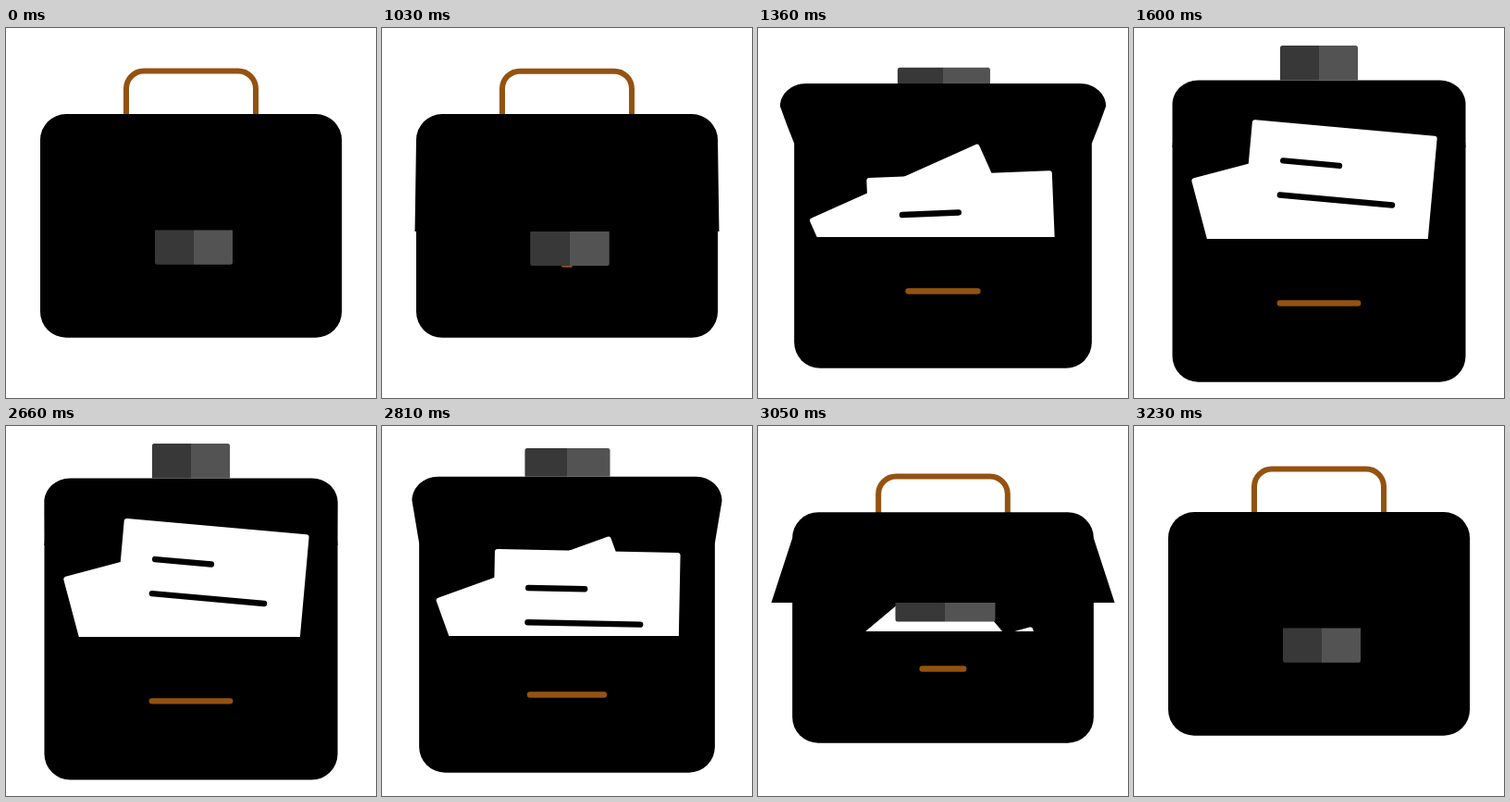
These frames come from a looping animation (400x400 px, 3.26 s). An HTML page with a canvas:

```html
<!DOCTYPE html>
<html lang="en">
<head>
<meta charset="utf-8">
<title>Briefcase</title>
<style>
  html, body { margin: 0; width: 100%; height: 100%; overflow: hidden; background: #fff; }
  canvas { display: block; width: 400px; height: 400px; }
</style>
</head>
<body>
<canvas></canvas>
<script>
const LOOP = 3260, STEP = 30, STEPS = 20, OPEN_AT = 1000, CLOSE_AT = 2630;
const BROWN = '#945210';
const canvas = document.querySelector('canvas');
const ctx = canvas.getContext('2d');
const ratio = window.devicePixelRatio || 1;
canvas.width = canvas.height = 400 * ratio;
ctx.scale(ratio, ratio);

const clamp = (v, lo = 0, hi = 1) => Math.min(hi, Math.max(lo, v));
const stepped = ms => clamp(Math.floor(ms / STEP) / STEPS);
const easeInOut = q => q < .5 ? .5 * (2 * q) ** 2.15 : 1 - .5 * (2 - 2 * q) ** 2.15;

// Piecewise linear value through [position, value] stops.
function track(p, stops) {
  const i = Math.max(1, stops.findIndex(s => s[0] >= p));
  const [p0, v0] = stops[i - 1], [p1, v1] = stops[i];
  return v0 + (v1 - v0) * (p - p0) / (p1 - p0);
}

function roundBox(x, y, w, h, radii, color) {
  ctx.beginPath();
  ctx.roundRect(x, y, w, h, radii);
  ctx.fillStyle = color;
  ctx.fill();
}

function line(x0, x1, y, color) {
  ctx.beginPath();
  ctx.moveTo(x0, y);
  ctx.lineTo(x1, y);
  ctx.lineWidth = 6.4;
  ctx.lineCap = 'round';
  ctx.strokeStyle = color;
  ctx.stroke();
}

// A sheet is placed by the middle of its top edge.
function sheet(x, y, degrees, lines = []) {
  ctx.save();
  ctx.translate(x, y);
  ctx.rotate(degrees * Math.PI / 180);
  roundBox(-100.3, 0, 200.6, 260, 3, '#fff');
  for (const [x0, x1, ly] of lines) line(x0, x1, ly, '#000');
  ctx.restore();
}

function drawContents(p, q) {
  ctx.save();
  ctx.beginPath();
  ctx.rect(0, 0, 400, Math.round(220.4 + 8 * p));
  ctx.clip();
  sheet(119.7 + 39 * p, 228.9 - 91.4 * p, -45 + 30.2 * p);
  sheet(194 + 34 * p, 270 - 162 * p, -19.2 + 24.4 * p,
    [[-63.3, -2.3, 41.3], [-63.3, 58.4, 78.5]]);
  ctx.restore();
  const half = 42.2 * (1 - (1 - q ** 1.2) ** 2.8);
  line(200 - half, 200 + half, 255.5 + 42 * p, BROWN);
}

// The flap swings through half a turn; its free edge widens toward the viewer.
function drawFlap(p, side, neck, edge, spread) {
  const ry = clamp(.38 * (neck - edge), 0, 26);
  const rx = Math.min(28, ry * 2);
  const outer = side - spread;
  const shoulder = edge + ry;
  const bendX = outer + spread * Math.min(.5, 2.4 * Math.abs(p - .5));
  const bendY = (shoulder + neck) / 2;
  const k = .448;
  ctx.beginPath();
  ctx.moveTo(side, neck);
  ctx.quadraticCurveTo(bendX, bendY, outer, shoulder);
  ctx.bezierCurveTo(outer, edge + ry * k, outer + rx * k, edge, outer + rx, edge);
  ctx.lineTo(400 - outer - rx, edge);
  ctx.bezierCurveTo(400 - outer - rx * k, edge, 400 - outer, edge + ry * k, 400 - outer, shoulder);
  ctx.quadraticCurveTo(400 - bendX, bendY, 400 - side, neck);
  ctx.fillStyle = '#000';
  ctx.fill();
}

function drawLatch(p, edge, swing) {
  const width = 84 + 30 * swing;
  const left = 200 + 3 * (1 - p) - width / 2;
  const middle = 203 - 3 * Math.min(1, 2 * p);
  const height = track(p, [[0, 37.3], [.5, -13], [.69, -17.2], [.9, -37], [1, -37.4]]);
  const y = Math.min(edge, edge + height), h = Math.abs(height);
  const down = height > 0;
  roundBox(left, y, middle - left, h, down ? [0, 0, 0, 2.5] : [2.5, 0, 0, 0], '#383838');
  roundBox(middle, y, left + width - middle, h, down ? [0, 0, 2.5, 0] : [0, 2.5, 0, 0], '#535353');
}

function draw(q) {
  const p = easeInOut(q);
  const turn = p ** (.73 - .28 * p);
  const sin = Math.sin(Math.PI * turn), cos = Math.cos(Math.PI * turn);
  const side = 37 + 4.5 * p * p;
  const top = 93 + 8 * p * p;
  const edge = 93 + 47.5 * turn - 3 * sin * p + (cos > 0 ? (125.5 + 18 * sin) * cos : 84 * cos);
  const flap = () => {
    drawFlap(p, side, top + 28, edge, 28.5 * sin);
    drawLatch(p, edge, sin);
  };

  ctx.fillStyle = '#fff';
  ctx.fillRect(0, 0, 400, 400);

  ctx.beginPath();
  ctx.roundRect(130 + p, 46.5 + 48 * p, 140 - 2 * p, 80, 19);
  ctx.lineWidth = 6;
  ctx.strokeStyle = BROWN;
  ctx.stroke();

  roundBox(side, top, 400 - 2 * side, 334.7 + 48 * p - top, 28, '#000');
  if (cos < 0) flap();
  if (q > 0) drawContents(p, q);
  if (cos >= 0) flap();
}

function frame() {
  const t = performance.now() % LOOP;
  draw(t < CLOSE_AT ? stepped(t - OPEN_AT) : 1 - stepped(t - CLOSE_AT));
  requestAnimationFrame(frame);
}
frame();
</script>
</body>
</html>
```
